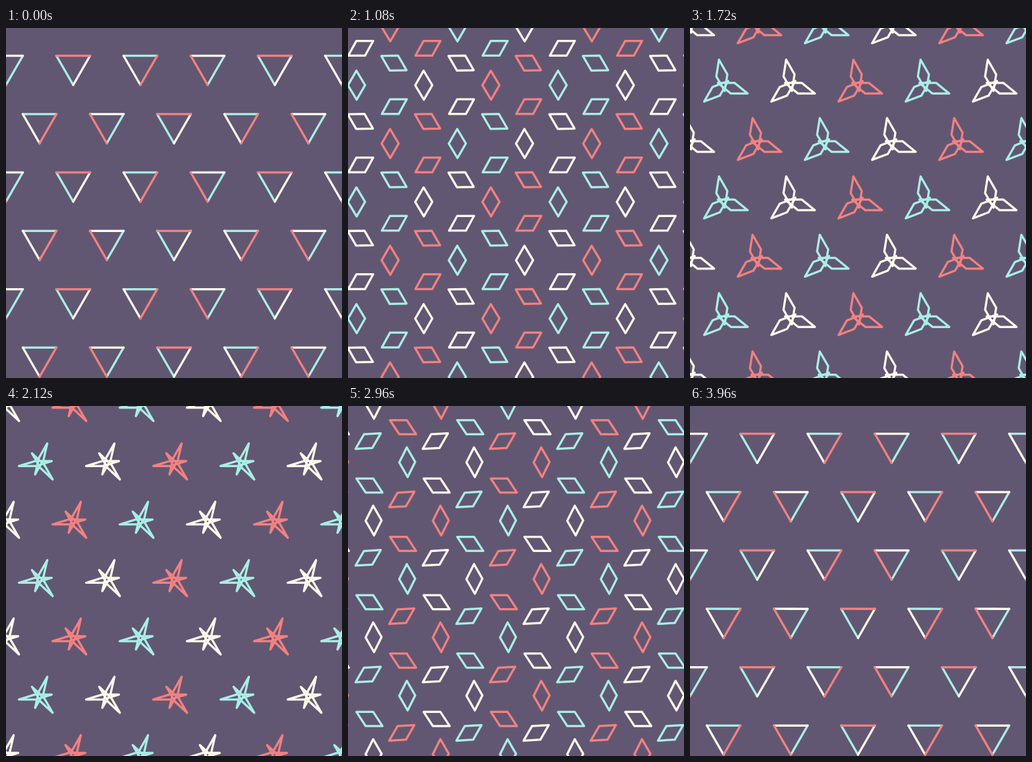
Write an HTML page that moves like this. It is 540x561 px and loops after 4000 ms.

```html
<!DOCTYPE html>
<html lang="en">
<head>
<meta charset="utf-8">
<title>Kagome stars</title>
<style>
  html, body { margin: 0; width: 100%; height: 100%; overflow: hidden; background: #625772; }
  svg { display: block; width: 100%; height: 100%; }
</style>
</head>
<body>
<svg id="stage" viewBox="0 0 540 561" fill="none" stroke-width="3.5" stroke-linejoin="round" stroke-linecap="round">
  <defs><path id="trio"/></defs>
</svg>
<script>
  const NS = 'http://www.w3.org/2000/svg';
  const LOOP = 4000;
  const SIDE = 27;                        // rhombus side
  const COL = SIDE * 4;                   // hexagon spacing
  const APOTHEM = SIDE * Math.sqrt(3);
  const ROW = APOTHEM * 2;
  const TOP = 91.3;
  const COLORS = ['#a9eee6', '#fefaec', '#f38181'];

  const stage = document.getElementById('stage');
  const trio = document.getElementById('trio');

  function add(parent, name, attrs) {
    const el = document.createElementNS(NS, name);
    for (const key in attrs) el.setAttribute(key, attrs[key]);
    return parent.appendChild(el);
  }

  // One group per colour, so that later colours cover earlier ones at shared corners
  const groups = COLORS.map(stroke => add(stage, 'g', { stroke }));
  for (let j = -1; j <= 6; j++) {
    const odd = j & 1;
    for (let i = -1; i <= 6; i++) {
      add(groups[(i + odd + 3) % 3], 'use', {
        href: '#trio',
        x: COL * i + (odd ? 0 : COL / 2),
        y: TOP + ROW * j
      });
    }
  }

  // Rhombus around a hexagon centre: flat along the edge at a = 0, flat along the radius at a = 90deg
  function rhombus(base, a) {
    const rx = Math.cos(base - a), ry = Math.sin(base - a);
    const r = APOTHEM * Math.cos(a);
    const along = SIDE * Math.cos(a), out = SIDE * Math.sin(a);
    const point = (u, v) => (rx * u - ry * v).toFixed(3) + ' ' + (ry * u + rx * v).toFixed(3);
    return 'M' + [point(r, along), point(r + out, 0), point(r, -along), point(r - out, 0)].join('L') + 'Z';
  }

  function draw(ms) {
    const u = (ms % LOOP) / LOOP;
    const a = Math.PI * (1 - Math.cos(Math.PI * u)) / 2;
    const d = [0, 1, 2].map(k => rhombus(Math.PI / 2 + k * Math.PI * 2 / 3, a)).join('');
    trio.setAttribute('d', d);
  }

  const start = performance.now();
  function tick() {
    draw(performance.now() - start);
    requestAnimationFrame(tick);
  }
  tick();
</script>
</body>
</html>
```
